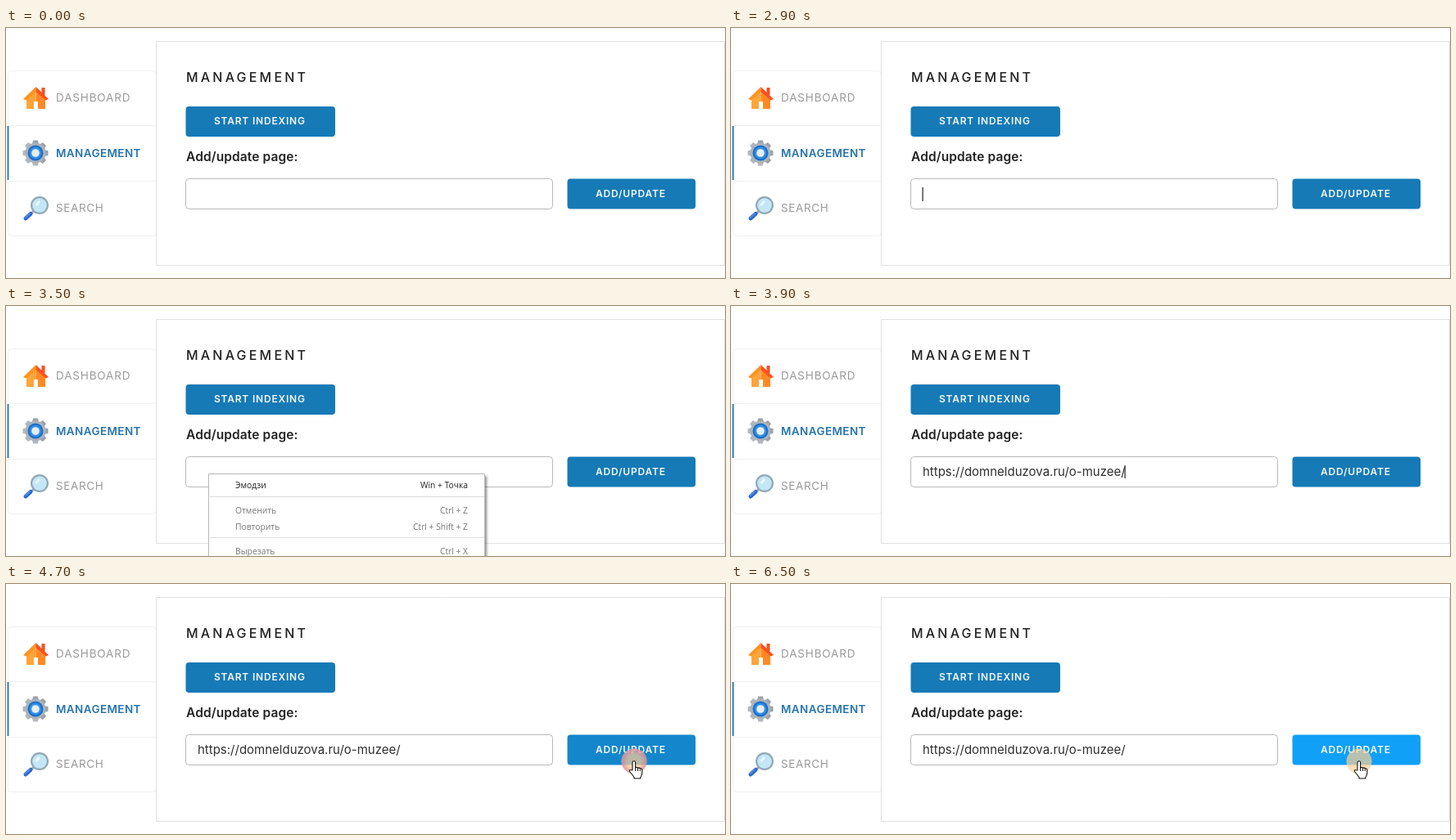
An HTML page with a canvas that plays this animation: 878 by 306 pixels, repeating every 8000 ms.

```html
<!DOCTYPE html>
<html lang="en">
<head>
<meta charset="utf-8">
<title>Management</title>
<style>
html, body { margin: 0; width: 100%; height: 100%; overflow: hidden; background: #fff; }
canvas { display: block; }
</style>
</head>
<body>
<canvas id="stage" width="878" height="306"></canvas>
<script>
const ctx = document.getElementById('stage').getContext('2d');
const LOOP = 8000;
const SANS = 'Inter, sans-serif';
const MENU_FONT = '10.3px "Open Sans", sans-serif';
const BLUE = [22, 122, 182], HOVER = [16, 160, 248];
const PAGE_URL = 'https://domnelduzova.ru/o-muzee/';

const HAND = new Path2D('M-2 11V1.6a1.8 1.8 0 0 1 3.6 0V8q1.5-1.2 3 .2 1.7-.8 2.7.6 2.4-.4 2.5 2V14q0 3-2 5.5V21H0V19.5Q-2 16.5-5.5 12.5q-.5-2.8 2-1.8Z');
const ARROW = new Path2D('M0 0V16L3.7 12.6 6.2 18.2 8.6 17.1 6.2 11.6H11.3Z');

const clamp = v => Math.max(0, Math.min(1, v));
const ease = v => v * v * (3 - 2 * v);
const mix = (a, b, k) => a + (b - a) * k;
const rgb = c => `rgb(${c.map(Math.round)})`;

function text(str, x, y, font, color, spacing = 0, align = 'left') {
  ctx.font = font;
  ctx.letterSpacing = spacing + 'px';
  ctx.textAlign = align;
  ctx.fillStyle = color;
  ctx.fillText(str, x, y);
}

function box(x, y, w, h, r, fill, stroke) {
  ctx.beginPath();
  ctx.roundRect(x, y, w, h, r);
  if (fill) { ctx.fillStyle = fill; ctx.fill(); }
  if (stroke) { ctx.strokeStyle = stroke; ctx.lineWidth = 1; ctx.stroke(); }
}

function rect(x, y, w, h, color) {
  ctx.fillStyle = color;
  ctx.fillRect(x, y, w, h);
}

function line(color, width, ...pts) {
  ctx.beginPath();
  pts.forEach(([x, y]) => ctx.lineTo(x, y));
  ctx.strokeStyle = color;
  ctx.lineWidth = width;
  ctx.stroke();
}

function poly(color, ...pts) {
  ctx.beginPath();
  pts.forEach(([x, y]) => ctx.lineTo(x, y));
  ctx.fillStyle = color;
  ctx.fill();
}

function disc(x, y, r, color) {
  ctx.beginPath();
  ctx.arc(x, y, r, 0, Math.PI * 2);
  ctx.fillStyle = color;
  ctx.fill();
}

function house() {
  rect(43.5, 73, 4, 9, '#f4511e');
  poly('#ffa53a', [25, 86], [36.5, 75], [36.5, 99], [25, 99]);
  poly('#ff8a24', [36.5, 75], [48, 86], [48, 99], [36.5, 99]);
  rect(34, 90, 5, 9, '#fff');
  poly('#ff9420', [36.5, 72], [36.5, 78], [24.5, 88.5], [21, 87]);
  poly('#fb5121', [36.5, 72], [52, 87], [48.5, 88.5], [36.5, 78]);
}

function gear() {
  ctx.save();
  ctx.translate(36, 153);
  for (let i = 0; i < 8; i++) {
    poly(i < 4 ? '#9aa1a8' : '#b2b8bd', [-4, -11], [-2.8, -15.5], [2.8, -15.5], [4, -11]);
    ctx.rotate(Math.PI / 4);
  }
  disc(0, 0, 12.5, '#adb3b8');
  disc(0, 0, 9.5, '#1a70cc');
  disc(0, 0, 7.2, '#3592e8');
  disc(0, 0, 4.8, '#e9edf0');
  ctx.restore();
}

function magnifier() {
  ctx.lineCap = 'round';
  line('#9aa6b1', 3, [34, 224], [31, 227]);
  line('#2c68cc', 5, [30, 227.5], [24, 233]);
  line('#4e8be6', 2, [29, 227], [23.5, 232]);
  ctx.lineCap = 'butt';
  disc(41, 217, 11, '#91a8b5');
  disc(41, 217, 8.8, '#c3e7f7');
  line('#eaf8ff', 3, [36.5, 217], [41, 212]);
}

function sidebar() {
  box(2.5, 52.5, 181, 202, 4, null, '#f0f0f0');
  for (const y of [119.5, 187.5]) line('#f0f0f0', 1, [3, y], [183, y]);
  rect(1.5, 120, 2, 66, '#2a7db8');
  house();
  gear();
  magnifier();
  text('DASHBOARD', 61, 90, `400 13.5px ${SANS}`, '#9a9a9a', 0.85);
  text('MANAGEMENT', 61, 158, `600 13.5px ${SANS}`, '#2674ae', 0.4);
  text('SEARCH', 61, 225, `400 13.5px ${SANS}`, '#9a9a9a', 0.6);
}

function button(x, y, w, label, labelX, color) {
  box(x, y, w, 37, 4, rgb(color));
  text(label, labelX, y + 22, `600 12px ${SANS}`, '#f4f8fb', 0.8);
}

function panel(hover) {
  box(183.5, 16.5, 694, 274, 0, '#fff', '#e0e0e0');
  text('MANAGEMENT', 220, 66, `500 16px ${SANS}`, '#222', 3.2);
  button(219.5, 96, 182.5, 'START INDEXING', 254, BLUE);
  text('Add/update page:', 220, 163, `600 15.5px ${SANS}`, '#222', 0.1);
  box(219.5, 184.5, 448, 37, 4, '#fff', '#b8b8b8');
  button(685.5, 184.5, 156.5, 'ADD/UPDATE', 720, BLUE.map((c, i) => mix(c, HOVER[i], hover)));
}

function menu(highlighted) {
  ctx.save();
  ctx.shadowColor = 'rgba(0,0,0,.45)';
  ctx.shadowBlur = 3;
  ctx.shadowOffsetX = ctx.shadowOffsetY = 2;
  rect(248, 206, 337, 110, '#fff');
  ctx.restore();
  box(247.5, 205.5, 337, 110, 0, null, '#b8b8b8');
  if (highlighted) rect(249, 209, 335, 20, '#e5e6e7');
  for (const y of [233.5, 283.5]) line('#dcdcdc', 1, [249, y], [584, y]);
  const items = [
    ['Эмодзи', 'Win + Точка', 223],
    ['Отменить', 'Ctrl + Z', 253.5],
    ['Повторить', 'Ctrl + Shift + Z', 273.5],
    ['Вырезать', 'Ctrl + X', 303.5]
  ];
  items.forEach(([label, keys, y], i) => {
    const color = i ? '#777' : '#222';
    text(label, 280, y, MENU_FONT, color);
    text(keys, 564, y, MENU_FONT, color, 0, 'right');
  });
}

function clickGlow(x, y, strength) {
  const glow = ctx.createRadialGradient(x, y, 8, x, y, 16);
  glow.addColorStop(0, 'rgba(205,115,165,0)');
  glow.addColorStop(0.8, `rgba(205,115,165,${0.6 * strength})`);
  glow.addColorStop(1, 'rgba(205,115,165,0)');
  disc(x, y, 16, glow);
}

function pointer(t) {
  const k = ease(clamp((t - 3900) / 700));
  const x = mix(300, 767, k), y = mix(345, 217, k);
  disc(x, y, 15.5, 'rgba(255,207,148,.7)');
  if (t >= 4700) clickGlow(x, y, clamp((5000 - t) / 300));
  const onButton = x > 685 && y < 222;
  const shape = onButton ? HAND : ARROW;
  ctx.save();
  ctx.translate(x, y);
  ctx.fillStyle = '#fff';
  ctx.fill(shape);
  ctx.strokeStyle = '#111';
  ctx.lineWidth = 1.1;
  ctx.lineJoin = 'round';
  ctx.stroke(shape);
  if (onButton) for (const fx of [1.6, 4.6, 7.3]) line('#111', 1, [fx, 8], [fx, 12]);
  ctx.restore();
}

function hoverAmount(t) {
  if (t < 4700) return 0;
  if (t < 4800) return 0.34;
  return t < 5000 ? 0.75 : 1;
}

function draw(t) {
  rect(0, 0, 878, 306, '#fff');
  sidebar();
  panel(hoverAmount(t));
  if (t >= 3900) text(PAGE_URL, 234, 207.5, `400 15px ${SANS}`, '#2f2f2f');
  if (t >= 2900 && t < 3500) rect(233.5, 195, 1.2, 17, '#222');
  if (t >= 3900 && t < 4400) rect(480.5, 195, 1.2, 16, '#222');
  if (t >= 3000 && t < 3900) menu(t >= 3200 && t < 3300);
  if (t >= 4000) pointer(t);
}

function tick() {
  draw(Math.floor((performance.now() % LOOP) / 100) * 100);
  requestAnimationFrame(tick);
}
tick();
</script>
</body>
</html>
```
